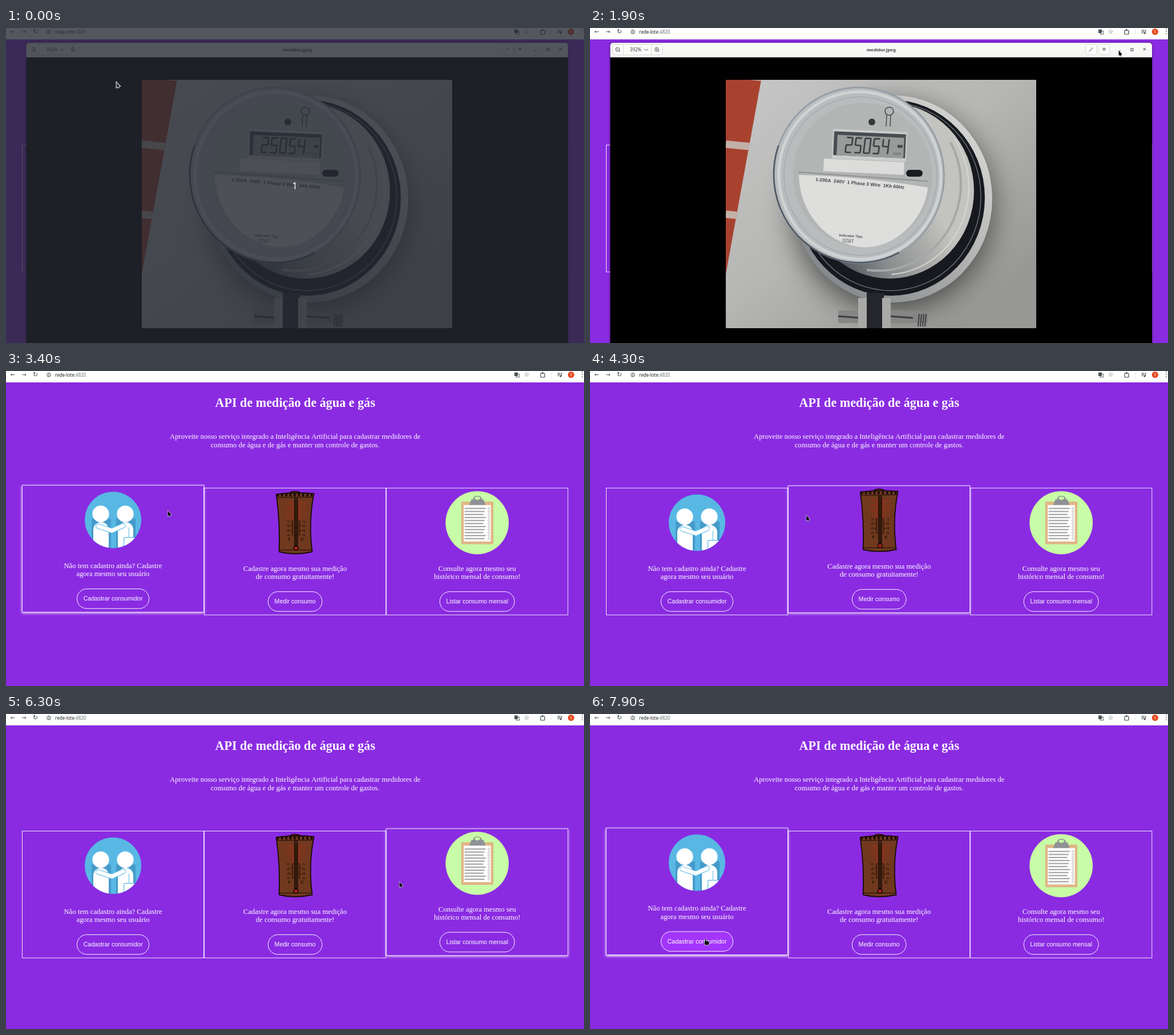
Recreate the animation shown at these times as an HTML page with a canvas. Size 1013 by 553 pixels, loop 8 s.

```html
<!DOCTYPE html>
<html lang="pt">
<head>
<meta charset="utf-8">
<style>
html, body { margin: 0; width: 100%; height: 100%; overflow: hidden; background: #8a2be2; }
canvas { display: block; }
</style>
</head>
<body>
<canvas id="stage" width="1013" height="553"></canvas>
<script>
const W = 1013, H = 553, LOOP = 8000, STEP = 100, RISE = 500;
const g = document.getElementById('stage').getContext('2d');
const SERIF = '"Liberation Serif", serif', SANS = '"Liberation Sans", sans-serif';
const UI = '"Noto Sans", sans-serif', ICON = '"DejaVu Sans", sans-serif';
const PURPLE = '#8a2be2', INK = '#3f4245', TAU = Math.PI * 2;

// ---------- helpers ----------
function fill(c) { g.fillStyle = c; g.fill(); }
function stroke(c, w = 1) { g.strokeStyle = c; g.lineWidth = w; g.stroke(); }
function box(x, y, w, h, c) { g.fillStyle = c; g.fillRect(x, y, w, h); }
function round(x, y, w, h, r) { g.beginPath(); g.roundRect(x, y, w, h, r); }
function oval(x, y, rx, ry = rx, rot = 0, a = 0, b = TAU) { g.beginPath(); g.ellipse(x, y, rx, ry, rot, a, b); }
function path(p) {
  g.beginPath();
  for (let i = 0; i < p.length; i += 2) g.lineTo(p[i], p[i + 1]);
}
function poly(c, ...p) { path(p); fill(c); }
function line(c, w, ...p) { path(p); stroke(c, w); }
function text(s, x, y, font, c = '#fff', align = 'center') {
  g.font = font; g.fillStyle = c; g.textAlign = align;
  g.fillText(s, x, y);
}
function icon(s, x, y, size) {
  g.textBaseline = 'middle';
  text(s, x, y, size + 'px ' + ICON, INK);
  g.textBaseline = 'alphabetic';
}
function grad(x0, y0, x1, y1, ...cs) {
  const q = g.createLinearGradient(x0, y0, x1, y1);
  cs.forEach((c, i) => q.addColorStop(i / (cs.length - 1), c));
  return q;
}
function group(draw) { g.save(); draw(); g.restore(); }
function at(x, y, turn, draw) {
  group(() => { g.translate(x, y); g.rotate(turn); draw(); });
}

// CSS "ease": cubic-bezier(.25, .1, .25, 1)
function ease(x) {
  let lo = 0, hi = 1;
  for (let i = 0; i < 20; i++) {
    const u = (lo + hi) / 2, v = 1 - u;
    if (.75 * u * v * v + .75 * u * u * v + u ** 3 < x) lo = u; else hi = u;
  }
  return .3 * lo * (1 - lo) ** 2 + 3 * lo * lo * (1 - lo) + lo ** 3;
}

// ---------- pointer path and hover ----------
// time, x, y, power of the ease-out that leads there
const stops = [
  [0, 193, 95], [100, 359, 194], [1900, 926, 39, 4], [2400, 926, 39], [3400, 283, 245],
  [3800, 283, 245], [4700, 402, 255], [5100, 402, 255], [6500, 695, 295], [6800, 695, 295],
  [7000, 655, 318, .6], [7100, 474, 334, 1], [7700, 203, 407], [7900, 203, 394]
];
function pointer(t) {
  const i = Math.max(1, stops.findIndex(s => s[0] >= t));
  const [t0, x0, y0] = stops[i - 1], [t1, x1, y1, p = 2] = stops[i];
  const k = 1 - (1 - (t - t0) / (t1 - t0)) ** p;
  return [x0 + (x1 - x0) * k, y0 + (y1 - y0) * k];
}
const LEFT = 28, TOP = 205, CW = 319.1, CH = 223.3;
function hovered(t) {
  const [x, y] = pointer(t);
  return t < 2200 || y < TOP || y > TOP + CH ? -1 : Math.floor((x - LEFT) / CW);
}
// a card rises slowly while hovered and drops at once when left
function lift(i, t) {
  let s = 0;
  while (s < RISE && hovered(t - s) === i) s += 10;
  return ease(s / RISE);
}
function onButton(t) {
  const [x, y] = pointer(t);
  return hovered(t) === 0 && Math.abs(x - 187.5) < 63 && Math.abs(y - 399) < 17;
}

// ---------- browser ----------
function toolbar() {
  box(0, 0, W, 20, '#fff');
  icon('←', 12, 7, 10); icon('→', 31.5, 7, 10); icon('↻', 51.5, 7, 11);
  icon('☆', 912.7, 7, 11); icon('⋮', 1010, 7, 13);
  oval(75, 6.8, 3.3); stroke(INK);
  box(74.5, 4.7, 1, 4, INK);
  text('rede-lote', 86, 9.6, '8px ' + UI, '#202124', 'left');
  text(':4820', 86 + g.measureText('rede-lote').width, 9.6, '8px ' + UI, '#6b6f74', 'left');
  box(891, 2.5, 6, 6.5, '#55595e');
  g.lineWidth = .8; g.strokeRect(894.5, 5.5, 5, 5.5);
  round(937, 4, 7, 7, 1); stroke(INK, 1.2);
  oval(940.3, 3.4, 1.3); fill(INK);
  box(955, 2, .8, 9, '#e0dcec');
  for (let i = 0; i < 3; i++) box(966.5, 3.5 + i * 2.2, i < 2 ? 5.5 : 3, 1, INK);
  line(INK, 1, 975, 4, 973.5, 4, 973.5, 9);
  oval(972, 9, 1.5); fill(INK);
  oval(990.3, 6.6, 5.6); fill('#e5481c');
  text('S', 990.3, 9, '6.5px ' + UI);
}

// ---------- card pictures, drawn around their centre ----------
function handshake() {
  const blue = '#58b8e3';
  oval(0, 0, 49.5); fill(blue); g.clip();
  for (const d of [-1, 1]) {
    const x = 21.5 * d;
    box(x - 16, -2, 34, 60, '#459ac9');
    oval(x, -10.5, 14.6); fill('#fff');
    round(x - 13, 4, 27, 60, 13); fill('#fff');
  }
  g.lineCap = 'round';
  for (const [c, w] of [[blue, 9], ['#fff', 7]]) {
    line(c, w, 18, 10, 0, 18);
    line(c, w, -26, 11, -2, 19);
  }
  line(blue, 1, 28, 14, 28, 30);
  round(19, 31, 20, 25, 2); fill('#fff'); stroke(blue, 1.2);
}
function thermometer() {
  const dark = '#180b05', brown = '#70391f';
  oval(0, -51, 10, 4); fill(brown); stroke(dark, 1.8);
  g.beginPath();
  g.moveTo(-33, -50); g.quadraticCurveTo(0, -54, 33, -51);
  g.quadraticCurveTo(23, 0, 30, 51);
  g.quadraticCurveTo(0, 58, -28, 51);
  g.quadraticCurveTo(-26, 0, -33, -50);
  fill(brown); stroke(dark, 1.8);
  for (let i = 0; i < 9; i++) box(-32 + i * 7.4, -51, 3.5, 5, dark);
  line(dark, 1, -32, -44, 32, -45);
  line(dark, 1, -27, 48, 29, 48);
  round(-.8, -43, 5, 84, 2.5); stroke(dark, 1.6);
  box(1, -40, 1.5, 81, '#000');
  oval(1.6, 44.5, 4, 3.5); fill('#b3251b'); stroke(dark, 1.8);
  for (let i = 0; i < 30; i++) {
    const y = -36 + i * 2, c = i < 16 ? '#b0281c' : dark, w = i % 5 ? 3 : 6;
    box(-3 - w, y, w, .9, c); box(6, y, w, .9, c);
    if (i % 4 == 0) for (const x of [-12, 15]) text(120 - i * 3, x, y + 4, '5.5px ' + SERIF, c);
  }
  text('F', -10, 32, 'italic bold 7px ' + SANS, dark);
  text('C', 12.5, 32, 'italic bold 7px ' + SANS, dark);
}
function checklist() {
  const green = '#c8fca6', gray = '#a5a6a8', clip = '#8f9296';
  oval(0, 0, 55.4); fill(green);
  round(-28, -37, 56.5, 75, 2); fill('#dfb687');
  box(-23.5, -31, 47.5, 64, '#fff');
  for (let i = 0; i < 11; i++) {
    const y = -25 + i * 5.3;
    box(-22, y - 1.1, 37 - i % 3 * 2, 2.2, gray);
    oval(20.5, y, 1.7); stroke(gray, .8);
  }
  poly(clip, -14, -31, -10, -41, 11, -41, 15, -31);
  oval(.5, -42, 7.5, 5.2); fill(clip);
  oval(.5, -43, 4.7, 2.8); fill(green);
}

// ---------- page ----------
const cards = [
  { pic: handshake, lines: ['Não tem cadastro ainda? Cadastre', 'agora mesmo seu usuário'], label: 'Cadastrar consumidor' },
  { pic: thermometer, lines: ['Cadastre agora mesmo sua medição', 'de consumo gratuitamente!'], label: 'Medir consumo' },
  { pic: checklist, lines: ['Consulte agora mesmo seu', 'histórico mensal de consumo!'], label: 'Listar consumo mensal' }
];
function card(i, k, active) {
  const { pic, lines, label } = cards[i], x = LEFT + CW * i, mid = x + CW / 2;
  group(() => {
    g.translate(0, -5.4 * k);
    if (k > 0) group(() => {
      g.beginPath(); g.rect(0, 0, W, H + 10); g.rect(x, TOP, CW, CH); g.clip('evenodd');
      g.shadowColor = `rgba(255,255,255,${k})`; g.shadowBlur = 4.5; g.shadowOffsetY = 2;
      box(x, TOP, CW, CH, PURPLE);
    });
    g.strokeStyle = 'rgba(255,255,255,.88)'; g.lineWidth = 1;
    g.strokeRect(x + .5, TOP + .5, CW - 1, CH - .6);
    at(mid, 266.3, 0, pic);
    lines.forEach((s, n) => text(s, mid, 350.8 + n * 14.5, '12.66px ' + SERIF));
    g.font = '10.55px ' + SANS;
    const w = g.measureText(label).width + 22.5;
    round(mid - w / 2, 387.4, w, 34.6, 17.3);
    if (active) fill('#a335fb');
    stroke('#fff', .95);
    text(label, mid, 408.2, g.font);
  });
}
function page(t) {
  box(0, 0, W, H, PURPLE);
  text('API de medição de água e gás', 506.7, 63, 'bold 22.16px ' + SERIF);
  text('Aproveite nosso serviço integrado a Inteligência Artificial para cadastrar medidores de', 506.7, 119, '12.66px ' + SERIF);
  text('consumo de água e de gás e manter um controle de gastos.', 506.7, 133.5, '12.66px ' + SERIF);
  const up = cards.map((c, i) => lift(i, t));
  [0, 1, 2].sort((a, b) => up[a] - up[b]).forEach(i => card(i, up[i], i === 0 && onButton(t)));
  toolbar();
}

// ---------- image viewer ----------
const segments = { 0: 'abcdef', 2: 'abged', 4: 'fgbc', 5: 'afgcd' };
function digit(n) {
  for (const k of segments[n]) {
    const upright = 'bcef'.includes(k);
    const x = 'bc'.includes(k) ? 10 : 0, y = k === 'd' ? 26 : 'cge'.includes(k) ? 13 : 0;
    line('#3a3f43', 2.6, x, y, upright ? x : 10, upright ? y + 13 : y);
  }
}
function wall() {
  box(238, 91, 544, 436, grad(300, 91, 640, 527, '#c4c5c4', '#b6b6b4', '#979795'));
  group(() => {
    path([238, 91, 300, 91, 238, 432]); g.clip();
    box(238, 91, 62, 341, '#a8422f');
    for (const y of [91, 210, 333]) line('#c3b0a8', y > 91 ? 13 : 4, 238, y - 6, 300, y);
  });
}
function clamp() {
  box(485, 465, 30, 62, '#24262b');
  for (const x of [435, 526]) {
    round(x, 496, x > 500 ? 66 : 40, 22, 4); fill('#858684');
    line('#3b3d40', 3, x, 506, x + 40, 509);
  }
  for (let i = 0; i < 4; i++) line('#3b3d40', 2, 577 + i * 4, 502, 575 + i * 4, 524);
  for (const x of [470, 512]) box(x, 474, 15, 53, '#a9aaa8');
}
function housing() {
  group(() => {
    g.shadowColor = 'rgba(0,0,0,.55)'; g.shadowBlur = 50; g.shadowOffsetY = 14;
    oval(530, 300, 175, 182); fill(grad(400, 440, 690, 200, '#83878b', '#a9aaa9', '#d4d4d2'));
  });
  oval(527, 298, 165, 172); fill('#17191f');
  oval(527, 296, 158, 165); stroke('#6b6f74', 1.5);
  oval(525, 286, 148, 154); fill(grad(390, 430, 610, 320, '#2f333b', '#898c8d', '#c3c3bf'));
  oval(518, 280, 146, 153, 0, -.6, 1.5); stroke('#d6d6d2', 2);
  oval(504, 274, 146, 152, 0, -.5, 1.7); stroke('#a6a8a7', 4);
}
function glass() {
  oval(471.5, 258.5, 149, 154, -.12); fill('#b9bcbd'); stroke('#929ba4', 2.5);
  oval(473, 259, 142, 147, -.12); stroke('#d0d3d4', 5);
  oval(474, 260, 134, 139, -.12); stroke('#a9aeb1', 2);
  oval(478, 258, 122, 127, -.1); fill('#b3b5b5');
  oval(471, 258, 149, 154, -.12, 1.2, 3.6); stroke('#4d5663', 2.5);
}
function label() {
  g.beginPath();
  g.moveTo(366, 258); g.quadraticCurveTo(475, 260, 592, 280);
  g.bezierCurveTo(588, 330, 540, 386, 480, 385);
  g.bezierCurveTo(420, 382, 368, 330, 366, 258);
  fill('#dededd');
  line('#8f9292', 2, 365, 253, 592, 269);
  at(395, 268.5, .09, () => text('1-200A  240V  1 Phase 3 Wire  1Kh 60Hz', 0, 0, 'bold 8.3px ' + SANS, '#43464a', 'left'));
  at(457, 367, .07, () => {
    text('Indicador Tipo', 0, 0, 'bold 6px ' + SANS, '#4a4d50');
    text('0287', -4, 10, '9px ' + SANS, '#4a4d50');
  });
}
function display() {
  at(491, 206, .045, () => {
    box(-66, -26, 130, 52, '#cbcccb');
    box(-64, -22, 126, 42, '#474c51');
    box(-58, -16, 117, 36, '#979b99');
    [...'25054'].forEach((n, i) => group(() => {
      g.transform(1, 0, -.08, 1, i * 16 - 41, -12);
      digit(n);
    }));
    box(48, -3, 9, 5, '#474c51');
    text('kWh', 48, 15, '7px ' + SANS, '#555a5c');
    box(-80, 27, 141, 22, '#dcdcda');
  });
  round(554, 249, 29, 12, 6); fill('#1b1c20');
  oval(494, 165, 6); fill('#35383c');
  oval(524.5, 146, 7.5, 7); stroke(INK, 1.5);
  for (const x of [520, 527]) line(INK, 1.4, x, 152, x - 1, 173);
}
function photo() {
  g.beginPath(); g.rect(238, 91, 544, 436); g.clip();
  [wall, housing, clamp, glass, label, display].forEach(draw => draw());
}
function viewer() {
  group(() => {
    g.shadowColor = 'rgba(0,0,0,.45)'; g.shadowBlur = 4;
    round(35.5, 26, 949.5, 540, [5, 5, 0, 0]); fill('#000');
  });
  round(35.5, 26, 949.5, 25.5, [5, 5, 0, 0]); fill(grad(0, 26, 0, 51, '#fbfbfa', '#f6f5f4'));
  const edge = '#d8d4d0';
  for (const [x, w] of [[39, 88], [868, 20], [891, 20]]) {
    round(x + .5, 28.5, w - .5, 18.5, 3); fill('#fcfcfb'); stroke(edge, .9);
  }
  for (const x of [48.3, 117]) {
    box(x < 100 ? 58 : 107, 29, .9, 18, edge);
    oval(x, 37.6, 3.4); stroke(INK, .9);
    line(INK, 1, x + 2.4, 40, x + 4.4, 42);
    line(INK, .9, x - 1.6, 37.6, x + 1.6, 37.6);
  }
  line(INK, .9, 117, 36, 117, 39.2);
  line(INK, .9, 95, 37, 98.5, 39.6, 102, 37);
  text('392%', 80, 41, '8px ' + UI, INK);
  text('medidor.jpeg', 510.3, 41, 'bold 7.8px ' + UI, INK);
  line(INK, 1, 874.5, 41.5, 881.5, 34.5);
  icon('≡', 901, 38, 9);
  box(926, 39.5, 4, 1, INK);
  g.lineWidth = 1; g.strokeRect(947.8, 36, 4, 4);
  icon('×', 971.8, 38, 9);
  group(photo);
}

// ---------- pointer shapes ----------
function arrow(dim) {
  const rim = dim ? '#f2f2f2' : 'rgba(255,255,255,.75)', body = dim ? '#33383d' : '#0a0a0a';
  line(rim, 3, 2, 6, 4.2, 10);
  path([0, 0, 0, 9, 6.2, 6.6]); g.closePath();
  stroke(rim, dim ? 2 : 1.3); fill(body);
  line(body, 1.5, 2, 6, 4.1, 9.8);
}
function hand() {
  g.beginPath();
  g.roundRect(-2, .5, 2, 8, 1);
  g.roundRect(-3, 4, 8, 7, 2.5);
  stroke('rgba(255,255,255,.85)', 1.4); fill('#15101c');
}

function render(t) {
  const intro = t < 100, [x, y] = pointer(t);
  page(t);
  if (t < 2200) viewer();
  if (intro) {
    box(0, 0, W, H, 'rgba(37,41,50,.785)');
    text('1', 506, 283, '17px ' + UI);
  }
  at(x + .6, y + .6, 0, () => onButton(t) ? hand() : arrow(intro));
}

let start = null, last = -1;
function tick(now) {
  if (start === null) start = now;
  const t = Math.floor((now - start) % LOOP / STEP) * STEP;
  if (t !== last) render(last = t);
  requestAnimationFrame(tick);
}
render(0);
requestAnimationFrame(tick);
</script>
</body>
</html>
```
